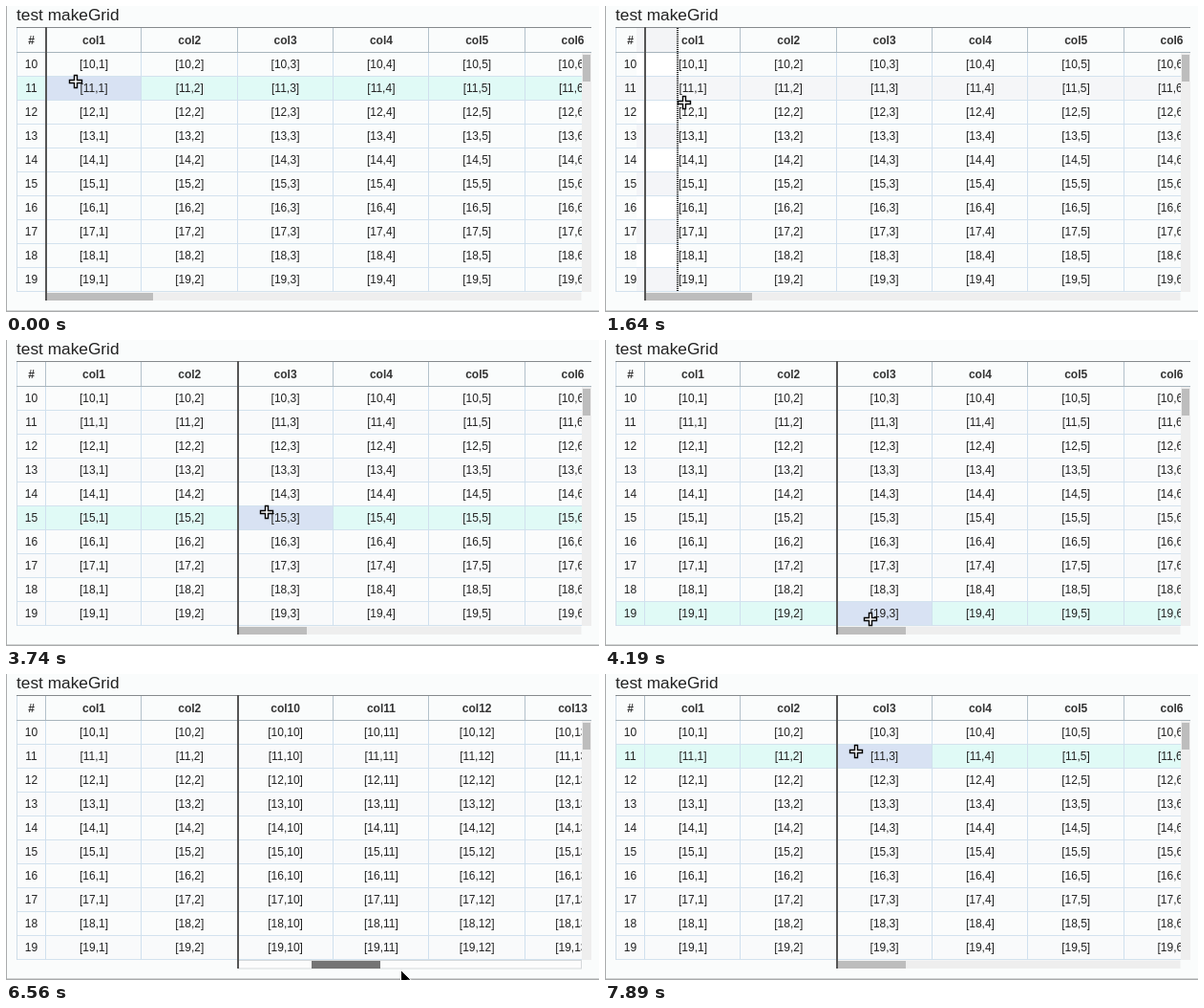
Write an HTML page that moves like this. It is 621 by 320 pixels and loops after 8000 ms.

```html
<!DOCTYPE html>
<html lang="en">
<head>
<meta charset="utf-8">
<title>test makeGrid</title>
<style>
  html, body { margin: 0; width: 100%; height: 100%; overflow: hidden; background: #fafcfc; }
  svg { display: block; width: 621px; height: 320px; }
  text { font: 12px "Liberation Sans", Arial, sans-serif; fill: #222; text-anchor: middle; }
  .head { font-weight: bold; fill: #333; }
  .title { font-size: 17.3px; text-anchor: start; }
</style>
</head>
<body>
<svg id="stage" viewBox="0 0 621 320">
  <defs>
    <clipPath id="bodyClip"><rect x="11" y="48" width="592" height="251"/></clipPath>
    <clipPath id="headClip"><rect x="11" y="22" width="602" height="27"/></clipPath>
  </defs>
  <rect width="621" height="320" fill="#fafcfc"/>
  <g id="fills"></g>
  <g id="lines"></g>
  <text class="title" x="11" y="15">test makeGrid</text>
  <g id="heads" clip-path="url(#headClip)"></g>
  <g id="cells" clip-path="url(#bodyClip)"></g>
  <g id="bars"></g>
  <g id="drag">
    <path id="dots" d="M0 23V298" stroke="#000" stroke-width="2" stroke-dasharray="1 1"/>
    <path id="snap" d="M-1 22H1V298H-1ZM-2 15H2V18H4L0 23L-4 18H-2Z" fill="#1673d0"/>
  </g>
  <path id="cross" d="M-1.5-6.5H1.5V-1.5H6.5V1.5H1.5V6.5H-1.5V1.5H-6.5V-1.5H-1.5Z" fill="#fff" stroke="#000" stroke-width="1.4"/>
  <path id="arrow" d="M0 0V15L3.5 11.8L6 17.5L8.6 16.3L6.2 10.8H11Z" fill="#000" stroke="#fff"/>
</svg>
<script>
const LOOP = 8000, TICK = 148.8, START = 440;
const LEFT = 42, COL = 100.3, TOP = 48, ROW = 25, ROWS = 10, COLS = 6;

// [tick, x, y]
const pointer = [
  [-1, 73, 79], [1, 66, 96], [3, 50, 116], [4, 41, 110], [7, 41, 110],
  [8, 83, 101], [12, 260, 106], [14, 322, 110], [15, 305, 110], [18, 255, 112],
  [21, 268, 184], [22, 273, 180], [25, 278, 292], [26, 280, 335], [28, 350, 335],
  [29, 345, 317], [33, 323, 309], [35, 318, 306], [37, 322, 308], [41, 413, 309],
  [42, 420, 309], [46, 322, 308], [47, 322, 308], [48, 290, 230], [49, 262, 66], [50, 263, 81]
];
const handle = [[8, 76], [14, 322], [15, 315], [18, 258]];
const glow = [[28, 0], [33, .25], [35, 1], [47, 1], [49, 0]];

const $ = id => document.getElementById(id);

function add(parent, tag, attrs, text) {
  const el = document.createElementNS("http://www.w3.org/2000/svg", tag);
  set(el, attrs);
  if (text !== undefined) el.textContent = text;
  $(parent).append(el);
  return el;
}

function set(el, attrs) {
  for (const k in attrs) el.setAttribute(k, attrs[k]);
}

function show(el, on) {
  el.style.display = on ? "" : "none";
}

function move(el, x, y = 0) {
  el.setAttribute("transform", `translate(${x} ${y})`);
}

function rect(parent, x, y, width, height, fill) {
  return add(parent, "rect", { x, y, width, height, fill });
}

function at(points, n, i = 1) {
  if (n <= points[0][0]) return points[0][i];
  const k = points.findIndex(p => p[0] >= n);
  if (k < 0) return points[points.length - 1][i];
  const a = points[k - 1], b = points[k];
  return a[i] + (b[i] - a[i]) * (n - a[0]) / (b[0] - a[0]);
}

const edge = c => Math.round(LEFT + c * COL);
const mid = c => LEFT + 50 + c * COL;
const gray = (a, b, k) => {
  const v = Math.round(a + (b - a) * k);
  return `rgb(${v},${v},${v})`;
};

// backgrounds
const rowFills = [], dragFills = [];
for (let r = 0; r < ROWS; r++) {
  const y = TOP + 1 + r * ROW;
  rowFills.push(rect("fills", 12, y, 591, ROW, "none"));
  dragFills.push(rect("fills", 33, y, 0, ROW, r % 2 ? "#f4f5f8" : "#fff"));
}
const headFill = rect("fills", 33, 23, 0, 25, "#f3f4f6");
const cellFill = rect("fills", 0, 0, 100, ROW, "#d8e2f3");

// grid lines
for (let r = 1; r <= ROWS; r++) rect("lines", 11, TOP + r * ROW, 592, 1, "#d3e2ee");
rect("lines", 11, 22, 1, 277, "#cfdde8");
for (let c = 0; c < COLS; c++) {
  const x = edge(c) - 1;
  rect("lines", x, TOP, 1, 251, "#d0e0ee");
  rect("lines", x, 22, 1, 26, "#b3c1cb");
}
rect("lines", 11, 22, 602, 1, "#858a8d");
rect("lines", 11, TOP, 602, 1, "#a7b4bc");
rect("lines", 0, 0, 1, 320, "#a9abac");
rect("lines", 0, 318.5, 621, 1.5, "#a9abac");

// text
const heads = [], cells = [];
add("heads", "text", { class: "head", x: 26.5, y: 40 }, "#");
for (let c = 0; c < COLS; c++) heads.push(add("heads", "text", { class: "head", x: mid(c), y: 40 }));
for (let r = 0; r < ROWS; r++) {
  const y = 65 + r * ROW;
  add("cells", "text", { x: 26.5, y }, 10 + r);
  for (let c = 0; c < COLS; c++) cells.push(add("cells", "text", { x: mid(c), y }));
}

// scrollbars and frozen edge
rect("bars", 603, 49, 10, 250, "#eee");
rect("bars", 604, 51, 8, 28, "#bdbdbd");
const track = rect("bars", 0, 299.5, 0, 8.5, "#eee");
const thumb = rect("bars", 0, 300, 0, 8, "#bdbdbd");
const frozenEdge = rect("bars", 0, 22, 2, 286, "#555");

function setText(el, s) {
  if (el.textContent !== s) el.textContent = s;
}

function fillText(fixed, scroll) {
  for (let c = 0; c < COLS; c++) {
    const col = c + 1 + (c < fixed ? 0 : scroll);
    setText(heads[c], "col" + col);
    for (let r = 0; r < ROWS; r++) setText(cells[r * COLS + c], `[${10 + r},${col}]`);
  }
}

function draw(n) {
  const x = at(pointer, n), y = at(pointer, n, 2);
  const dragging = n >= 8 && n <= 18;
  const released = n >= 19;
  const fixed = released ? 2 : 0;
  const isArrow = n >= 26 && n <= 47;
  const scroll = n >= 37 && n <= 46 ? Math.max(0, (x - 322) / 13) : 0;

  // hover
  const hovering = !dragging && !isArrow && x > LEFT && y < 298;
  const hot = hovering ? Math.floor((y - TOP) / ROW) : -1;
  rowFills.forEach((el, r) => {
    let fill = "none";
    if (r === hot) fill = "#e0faf6";
    else if (released) fill = r % 2 ? "#f9fafb" : "#fbfcfc";
    else if (r === 1) fill = "#f5f6f8";
    el.setAttribute("fill", fill);
  });
  show(cellFill, hovering);
  if (hovering) set(cellFill, { x: edge(Math.floor((x - LEFT) / COL)), y: TOP + 1 + hot * ROW });

  // column edge drag
  const line = at(handle, n);
  const width = dragging ? line - 33 : 0;
  dragFills.forEach((el, r) => set(el, { width: r % 2 ? Math.min(width, 207) : width }));
  set(headFill, { width: Math.min(width, 207) });
  show($("drag"), dragging);
  const target = Math.round((line - LEFT) / COL);
  move($("dots"), Math.round(line));
  move($("snap"), edge(target) - (target ? 1 : 0));
  show($("snap"), target > 0);

  // horizontal scrollbar
  const x0 = edge(fixed), g = at(glow, n), lit = g > .6;
  set(frozenEdge, { x: x0 - 1 });
  set(track, {
    x: x0 + .5, width: 602 - x0,
    fill: gray(238, 252, g), stroke: lit ? "#d5d9db" : "none"
  });
  set(thumb, {
    x: x0 + scroll * 11, width: fixed ? 72 : 112, fill: gray(189, 116, g)
  });
  fillText(fixed, Math.round(scroll));

  show($("cross"), !isArrow);
  show($("arrow"), isArrow);
  move($("cross"), Math.round(x), Math.round(y));
  move($("arrow"), Math.round(x) + .5, Math.round(y) + .5);
}

let last = null;
function frame() {
  const n = Math.floor((performance.now() % LOOP - START) / TICK);
  const tick = Math.max(-1, Math.min(50, n));
  if (tick !== last) draw(last = tick);
  requestAnimationFrame(frame);
}
frame();
</script>
</body>
</html>
```
